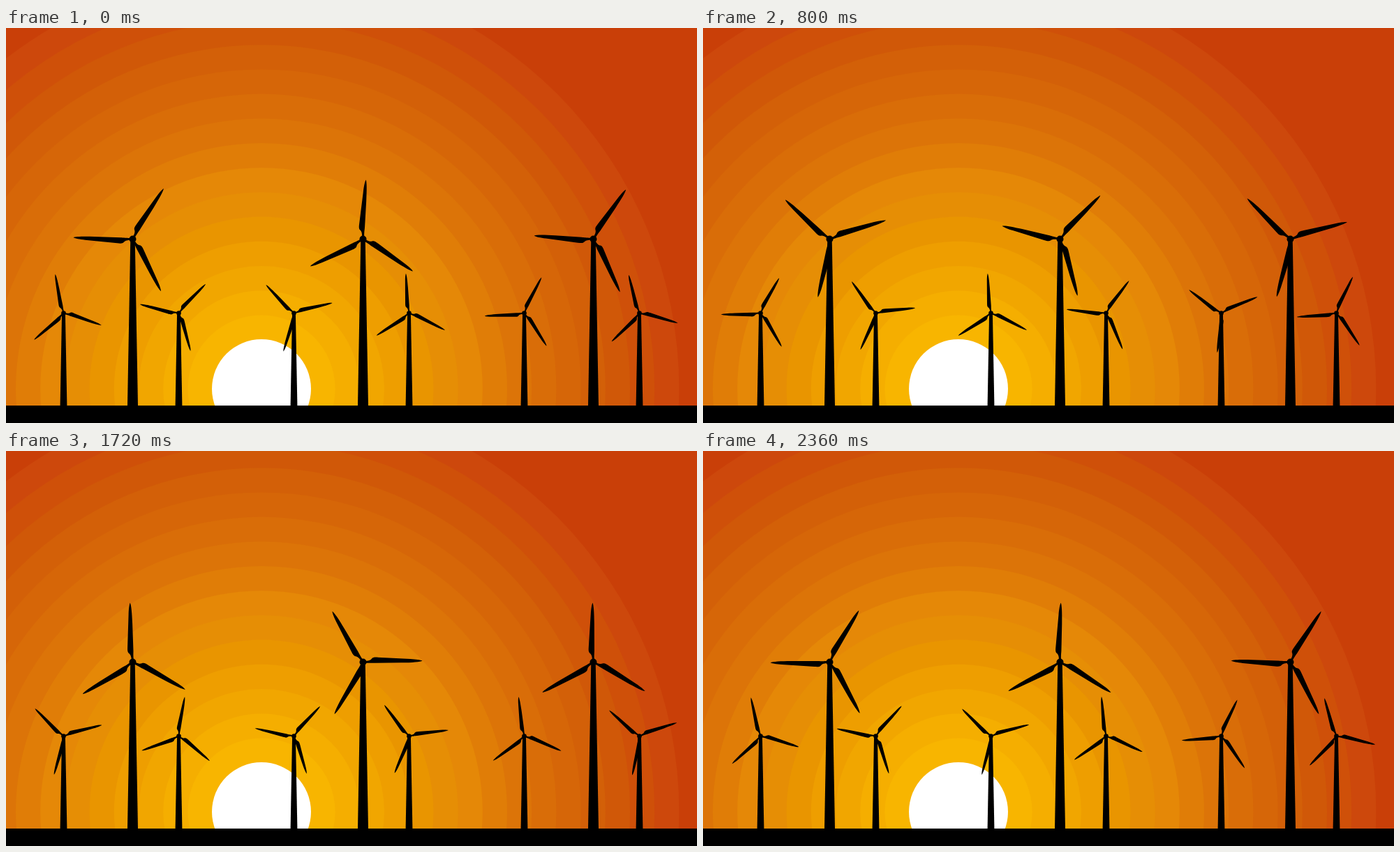
An HTML page with a canvas for the animation above (2.4 s loop, 990 by 566 pixels).

```html
<!DOCTYPE html>
<html lang="en">
<head>
<meta charset="utf-8">
<title>Wind farm at sunset</title>
<style>
  html, body { margin: 0; width: 100%; height: 100%; overflow: hidden; background: #000; }
  canvas { display: block; }
</style>
</head>
<body>
<canvas id="stage" width="990" height="566"></canvas>
<script>
const W = 990, H = 566, GROUND = 541;
const LOOP = 2400, STEP = 40, BLADE_GAP = 120;
const SUN = { x: 366, y: 517, r: 71 };
const BAND = 35.2;
// Sky rings from the sun outwards
const SKY = ['#f9b900', '#f9b800', '#f8b500', '#f5ae00', '#f1a600', '#ee9e00',
  '#e99500', '#e68e05', '#e58807', '#e07d07', '#dc7408', '#d96d08',
  '#d66608', '#d36008', '#d05808', '#cf5009', '#cd480c'];
const SKY_EDGE = '#c93f08';

const BIG = { y: 302.5, scale: 1, top: 3.2, base: 7.5 };
const SMALL = { y: 408.5, scale: 0.67, top: 2.4, base: 4.9 };
// Hub x and the starting angle of the first blade, in degrees from upright
const turbines = [
  [BIG, 181.5, 31.2], [BIG, 511.5, 2.5], [BIG, 841.5, 33],
  [SMALL, 82.5, -12.4], [SMALL, 247.5, 42.4], [SMALL, 412.5, -45],
  [SMALL, 577.5, -4.9], [SMALL, 742.5, 25.5], [SMALL, 907.5, -15.9]
];

const ctx = document.getElementById('stage').getContext('2d');
const blade = new Path2D(
  'M0.4 -85 C2 -82 2.4 -70 2.3 -55 L1.8 -17 C1.7 -13 1.2 -11 1.5 -4 ' +
  'L-1.5 -4 C-1.8 -9 -2.8 -11 -4.5 -12.5 C-6.8 -14.5 -6.7 -17 -6.3 -22 ' +
  'L-2.6 -68 C-2 -76 -1 -82 0.4 -85 Z');

function disc(c, x, y, r, color) {
  c.fillStyle = color;
  c.beginPath();
  c.arc(x, y, r, 0, Math.PI * 2);
  c.fill();
}

function paintScenery() {
  const layer = document.createElement('canvas');
  layer.width = W;
  layer.height = H;
  const c = layer.getContext('2d');
  c.fillStyle = SKY_EDGE;
  c.fillRect(0, 0, W, H);
  for (let i = SKY.length - 1; i >= 0; i--) disc(c, SUN.x, SUN.y, (i + 1) * BAND, SKY[i]);
  disc(c, SUN.x, SUN.y, SUN.r, '#fff');
  c.fillStyle = '#000';
  c.fillRect(0, GROUND, W, H - GROUND);
  for (const [kind, x] of turbines) {
    c.beginPath();
    c.moveTo(x - kind.top, kind.y);
    c.lineTo(x + kind.top, kind.y);
    c.lineTo(x + kind.base, GROUND);
    c.lineTo(x - kind.base, GROUND);
    c.fill();
  }
  return layer;
}

function drawRotor({ y, scale }, x, degrees) {
  ctx.save();
  ctx.translate(x, y);
  ctx.scale(scale, scale);
  disc(ctx, 0, 0, 5, '#000');
  ctx.rotate(degrees * Math.PI / 180);
  for (let i = 0; i < 3; i++) {
    ctx.fill(blade);
    ctx.rotate(BLADE_GAP * Math.PI / 180);
  }
  ctx.restore();
}

const scenery = paintScenery();

function draw(now) {
  const t = Math.floor((now % LOOP) / STEP) * STEP;
  const turn = BLADE_GAP * t / LOOP;
  ctx.drawImage(scenery, 0, 0);
  for (const [kind, x, start] of turbines) drawRotor(kind, x, start + turn);
}

let origin;
function tick(now) {
  origin ??= now;
  draw(now - origin);
  requestAnimationFrame(tick);
}
draw(0);
requestAnimationFrame(tick);
</script>
</body>
</html>
```
